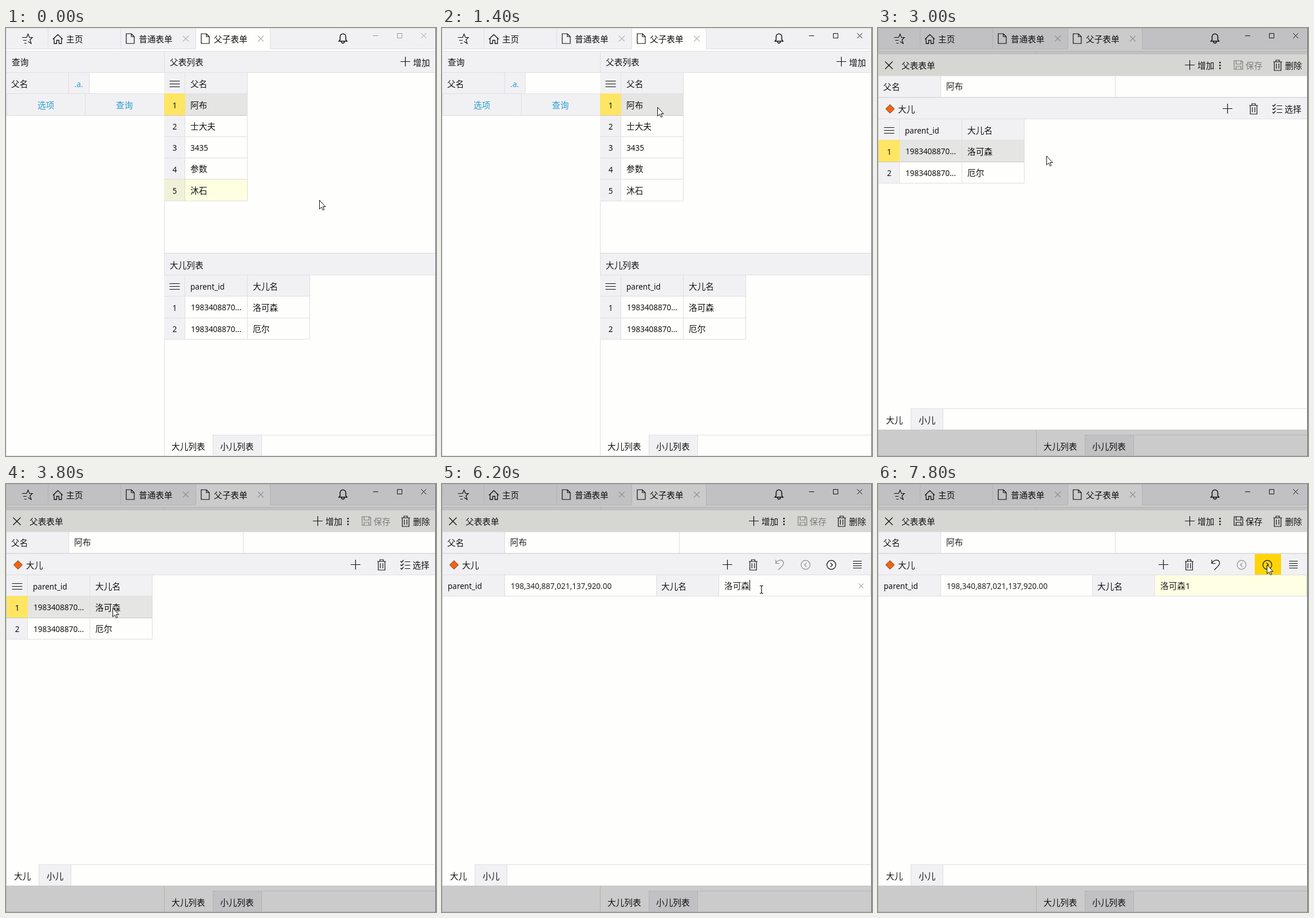
These frames come from a looping animation (751x746 px, 8 s). An HTML page:

```html
<!DOCTYPE html>
<html lang="zh-CN">
<head>
<meta charset="utf-8">
<style>
html, body { margin: 0; width: 100%; height: 100%; overflow: hidden; background: #fefefd; }
svg { display: block; width: 751px; height: 746px; }
text { font-family: "Noto Sans", "Noto Sans CJK SC", "Noto Sans CJK", sans-serif; white-space: pre; }
#rowHover { mix-blend-mode: multiply; }
</style>
</head>
<body>
<svg id="stage" viewBox="0 0 751 746"></svg>
<script>
const LOOP = 8000, STEP = 200;
const WHITE = '#fefefd', PANEL = '#f1f1f4', LINE = '#dfdfe1', INK = '#111', GREY = '#929292',
      BLUE = '#2a9fd0', HOVER = '#ffffe3';
const CHILD = '洛可森', PARENT = '阿布', LONG_ID = '1983408870...';

// Drawing helpers: each returns SVG markup.
const box = (x, y, w, h, fill, extra = '') =>
  `<rect x="${x}" y="${y}" width="${w}" height="${h}" fill="${fill}" ${extra}/>`;
const hline = (x, y, w, color = LINE) => box(x, y, w, 1, color);
const vline = (x, y, h, color = LINE) => box(x, y, 1, h, color);
const label = (text, x, cy, { color = INK, anchor = 'start', id } = {}) => {
  const latin = /^[\x20-\x7e]+$/.test(text);
  return `<text ${id ? `id="${id}"` : ''} x="${x}" y="${cy + (latin ? 5 : 5.4)}" font-size="${latin ? 13.5 : 14.67}"
    fill="${color}" text-anchor="${anchor}">${text}</text>`;
};
const icon = (x, y, d, color = INK, width = 1.2) =>
  `<path transform="translate(${x} ${y})" d="${d}" fill="none" stroke="${color}" stroke-width="${width}"/>`;
const group = (id, ...parts) => `<g id="${id}">${parts.join('')}</g>`;
const cross = r => `M${-r} ${-r}L${r} ${r}M${r} ${-r}L${-r} ${r}`;
const ring = r => `M${-r} 0a${r} ${r} 0 1 0 ${2 * r} 0a${r} ${r} 0 1 0 ${-2 * r} 0`;

const PATHS = {
  plus: 'M-8.5 0H8.5M0 -8.5V8.5',
  menu: 'M-9 -4.5H9M-9 .5H9M-9 5.5H9',
  lines: 'M-7.5 -5.5H7.5M-7.5 -1.5H7.5M-7.5 2.5H7.5M-7.5 6.5H7.5',
  list: 'M-9 -2H-1L1.5 -8 4 -2H9L5 2 7 8.5 1.5 5M-7 3H-1M-5 8H-1',
  home: 'M-8.5 .5L0 -7.5 8.5 .5M-6.5 -1V8H-2V2.5H2V8H6.5V-1',
  doc: 'M-7 -8.5H2L7 -3.5V8.5H-7ZM2 -8.5V-3.5H7',
  bell: 'M-7 4.5H7L5 2V-3C5 -10 -5 -10 -5 -3V2ZM-2.5 5C-2.5 9 2.5 9 2.5 5',
  trash: 'M-7.5 -6H7.5M-3 -6V-9H3V-6M-5.8 -6V9H5.8V-6M-2.2 -3V6M2.2 -3V6',
  save: 'M-7.5 -7.5H5.5L7.5 -5.5V7.5H-7.5ZM-4 -7.5V-1.5H4.5V-7.5M-4 7.5V2.5H4.5V7.5',
  checks: 'M-8.5 -6L-6.5 -4 -3 -8M-8.5 0L-6.5 2 -3 -2M-8.5 6L-6.5 8 -3 4M-1 -5H8.5M-1 1H8.5M-1 7H8.5',
  undo: 'M-6.5 -8.5V-2H0M-6.5 -2C-3 -9 5 -10 7 -4C8 0 4 3 -2 9',
  back: ring(7.8) + 'M1.5 -3.5L-2 0 1.5 3.5',
  next: ring(7.8) + 'M-1.5 -3.5L2 0 -1.5 3.5'
};

// Table with a numbered first column; row 1 is selected when asked.
function grid(x, y, titles, rows, { selected = false, hoverRow = 0 } = {}) {
  const edge = i => Math.round(y + 37.25 * i);
  const width = 36 + 109 * titles.length, height = edge(rows.length + 1) - y;
  let out = box(x, y, width, edge(1) - y, PANEL) + box(x, y, 36, height, PANEL);
  if (selected) out += box(x + 37, edge(1), width - 37, 38, '#e5e5e3');
  for (let i = 0; i <= rows.length + 1; i++)
    out += hline(x, edge(i), width, selected && i === 2 ? '#c9c9c9' : LINE);
  for (let c = 0; c <= titles.length; c++) out += vline(x + 36 + 109 * c, y, height);
  if (selected) out += box(x, edge(1), 37, 38, '#ffe564');
  if (hoverRow) out += group('rowHover', box(x, edge(hoverRow), width + 1, 38, HOVER));
  out += icon(x + 18.5, y + 20, PATHS.menu, INK, 1.1);
  titles.forEach((title, c) => out += label(title, x + 46 + 109 * c, y + 20.5));
  rows.forEach((row, r) => {
    const cy = y + 57.8 + 37.25 * r;
    out += label(String(r + 1), x + 18.5, cy, { anchor: 'middle' });
    row.forEach((cell, c) => out += label(cell, x + 46 + 109 * c + (cell === LONG_ID ? 1 : 0), cy - .5));
  });
  return out;
}

const tab = (x, text) => icon(x + 7.5, 18.5, PATHS.doc) + label(text, x + 22.5, 19.5)
  + icon(x + 104.5, 18.5, cross(5), '#b5b5b5', 1.1);

const windowButtons = color => icon(0, 0, 'M641 13.5H650M683.5 9.5H691.5V17.5H683.5Z', color, 1)
  + icon(729.5, 13.5, cross(4.5), color, 1);

const childRows = [[LONG_ID, CHILD], [LONG_ID, '厄尔']];
const childTitles = ['parent_id', '大儿名'];

const page = [
  box(0, 0, 751, 746, WHITE),
  box(0, 0, 750, 36, PANEL), box(331, 0, 130, 37, WHITE),
  hline(0, 0, 750), hline(0, 36, 331), hline(461, 36, 289),
  ...[73, 200, 331, 461].map(x => vline(x, 0, 36)),
  icon(37, 18.5, PATHS.list), icon(90.5, 19, PATHS.home, INK, 1.3), label('主页', 105, 19.5),
  tab(209.5, '普通表单'), tab(340.5, '父子表单'), icon(588.5, 18.5, PATHS.bell, INK, 1.5),

  box(0, 40, 750, 37, PANEL), hline(0, 40, 750), hline(0, 77, 750),
  label('查询', 10, 60), label('父表列表', 286, 60),
  icon(697.5, 58.5, PATHS.plus), label('增加', 711, 60.5),
  box(1, 78, 144, 36, PANEL), vline(109, 78, 36), vline(145, 78, 36),
  label('父名', 9, 98), label('.a.', 127, 97.5, { color: BLUE, anchor: 'middle' }),
  box(1, 115, 275, 37, PANEL), hline(0, 114, 276), hline(0, 152, 276), vline(1, 115, 37), vline(138, 115, 37),
  label('选项', 55, 135, { color: BLUE }), label('查询', 192, 135, { color: BLUE }),

  vline(276, 40, 705), vline(0, 0, 746), hline(0, 745, 750),
  grid(276, 77, ['父名'], [[PARENT], ['士大夫'], ['3435'], ['参数'], ['沐石']], { selected: true, hoverRow: 5 }),
  box(277, 393, 473, 37, PANEL), hline(277, 392, 473, '#d5d6da'), hline(277, 430, 473),
  label('大儿列表', 286, 413.5),
  grid(276, 430, childTitles, childRows),
  box(361, 709, 86, 36, PANEL), hline(361, 709, 389), vline(361, 709, 36), vline(446, 709, 36),
  label('大儿列表', 289, 729.5), label('小儿列表', 374, 729.5)
].join('');

const childGrid = group('childGrid',
  icon(610.5, 140.5, PATHS.plus), icon(656, 141, PATHS.trash),
  icon(697.5, 140.5, PATHS.checks), label('选择', 710, 141.5),
  grid(1, 158, childTitles, childRows, { selected: true }));

const childForm = group('childForm',
  group('nextHover', box(658, 122, 46, 36, '#ffd40a')),
  icon(498.5, 140.5, PATHS.plus), icon(543.5, 141, PATHS.trash),
  group('undo', icon(589.5, 140.5, PATHS.undo)),
  icon(635, 141, PATHS.back, GREY), icon(680, 141, PATHS.next), icon(725.5, 140, PATHS.lines),
  box(1, 159, 109, 36, PANEL), box(375, 159, 109, 36, PANEL),
  group('edited', box(485, 159, 264, 36, HOVER)),
  hline(1, 158, 748), hline(1, 195, 748), ...[109, 374, 483, 748].map(x => vline(x, 158, 37)),
  label('parent_id', 10, 178), label('198,340,887,021,137,920.00', 120, 177.5, { color: '#222' }),
  label('大儿名', 383, 178.5), label(CHILD, 493, 177.5, { color: '#222', id: 'childName' }),
  group('clear', icon(732, 177.5, cross(4), '#777', 1)),
  group('caret', vline(0, 167, 19, '#000')));

const dialog = group('dialog',
  box(0, 0, 751, 746, '#000', 'opacity=".2"'),
  box(0, 46, 750, 655, WHITE), box(0, 46, 750, 37, '#d6d6d3'),
  icon(19, 65, cross(6.5), INK, 1.4), label('父表表单', 41, 66),
  icon(544.5, 64.5, PATHS.plus), label('增加', 558, 66),
  ...[59, 64, 69].map(y => box(596, y, 2.5, 2.5, INK)),
  group('save', icon(629.5, 64.5, PATHS.save), label('保存', 642, 66)),
  icon(698, 65, PATHS.trash), label('删除', 711, 66),
  box(1, 84, 108, 36, PANEL), hline(0, 83, 750), hline(0, 120, 750), vline(109, 83, 37), vline(414, 83, 37),
  label('父名', 9, 103), label(PARENT, 119, 102, { color: '#222' }),
  box(1, 121, 748, 37, PANEL), hline(1, 121, 748), hline(1, 158, 748),
  '<path d="M21 133.5L28.5 141 21 148.5 13.5 141Z" fill="#f7630c" stroke="#5b3018"/>', label('大儿', 35, 141.5),
  childGrid, childForm,
  box(57, 663, 57, 37, PANEL), hline(57, 663, 692), vline(57, 663, 37), vline(113, 663, 37),
  label('大儿', 14, 684), label('小儿', 71, 684),
  hline(0, 700, 750, '#c8c8c8'), vline(0, 46, 655, '#c8c8c8'), vline(749, 46, 655, '#c8c8c8'));

const stage = document.getElementById('stage');
stage.innerHTML = page + dialog
  + group('inactive', windowButtons('#999')) + group('active', windowButtons(INK))
  + vline(750, 0, 746, '#606060')
  + '<path id="arrow" d="M.5 0V15.5L4 12.3 6.5 17.5 8.7 16.5 6.3 11.5H11Z" fill="#fff" stroke="#111"/>'
  + '<path id="beam" d="M-3 -6.5H-.8L0 -5.5 .8 -6.5H3M0 -5.5V5.5M-3 6.5H-.8L0 5.5 .8 6.5H3" fill="none" stroke="#111" stroke-width="1.2"/>';

const el = Object.fromEntries([...stage.querySelectorAll('[id]')].map(node => [node.id, node]));
const show = (id, on) => { el[id].style.display = on ? '' : 'none'; };

// Pointer stops: time, x, y.
const stops = [
  [0, 547, 300], [1000, 376, 138], [1500, 376, 138], [2200, 437, 232], [2400, 437, 232],
  [3500, 186, 216], [4000, 186, 216], [4800, 461, 189], [5800, 558, 184], [7200, 558, 184], [7800, 679, 141]
];
function pointerAt(t) {
  const i = stops.findIndex(stop => stop[0] > t);
  if (i < 0) return stops.at(-1).slice(1);
  const [t0, x0, y0] = stops[i - 1], [t1, x1, y1] = stops[i];
  const p = (t - t0) / (t1 - t0), eased = p * p * (3 - 2 * p);
  return [x0 + (x1 - x0) * eased, y0 + (y1 - y0) * eased].map(Math.round);
}

function render(time) {
  const t = Math.floor(time % LOOP / STEP) * STEP;
  const [x, y] = pointerAt(t);
  const form = t >= 4200, focused = t >= 5800 && t < 7800, edited = t >= 6600;
  const overField = form && x > 485 && y > 159;
  const pointerHidden = t >= 6600 && t < 7400;

  show('rowHover', t < 600);
  show('inactive', t < 1000);
  show('active', t >= 1000);
  show('dialog', t >= 1600);
  show('childGrid', !form);
  show('childForm', form);
  show('edited', edited);
  show('clear', focused);
  show('caret', focused && (t - 5800) % 1000 < 600);
  show('nextHover', x > 658 && x < 704 && y > 122 && y < 158);
  el.childName.textContent = CHILD + (edited ? '1' : '');
  el.caret.setAttribute('transform', `translate(${edited ? 546 : 537})`);
  el.save.setAttribute('opacity', edited ? 1 : .45);
  el.undo.setAttribute('opacity', edited ? 1 : .45);
  show('arrow', !overField && !pointerHidden);
  show('beam', overField && !pointerHidden);
  for (const id of ['arrow', 'beam']) el[id].setAttribute('transform', `translate(${x} ${y})`);
}

const start = performance.now();
(function tick() {
  render(performance.now() - start);
  requestAnimationFrame(tick);
})();
</script>
</body>
</html>
```
